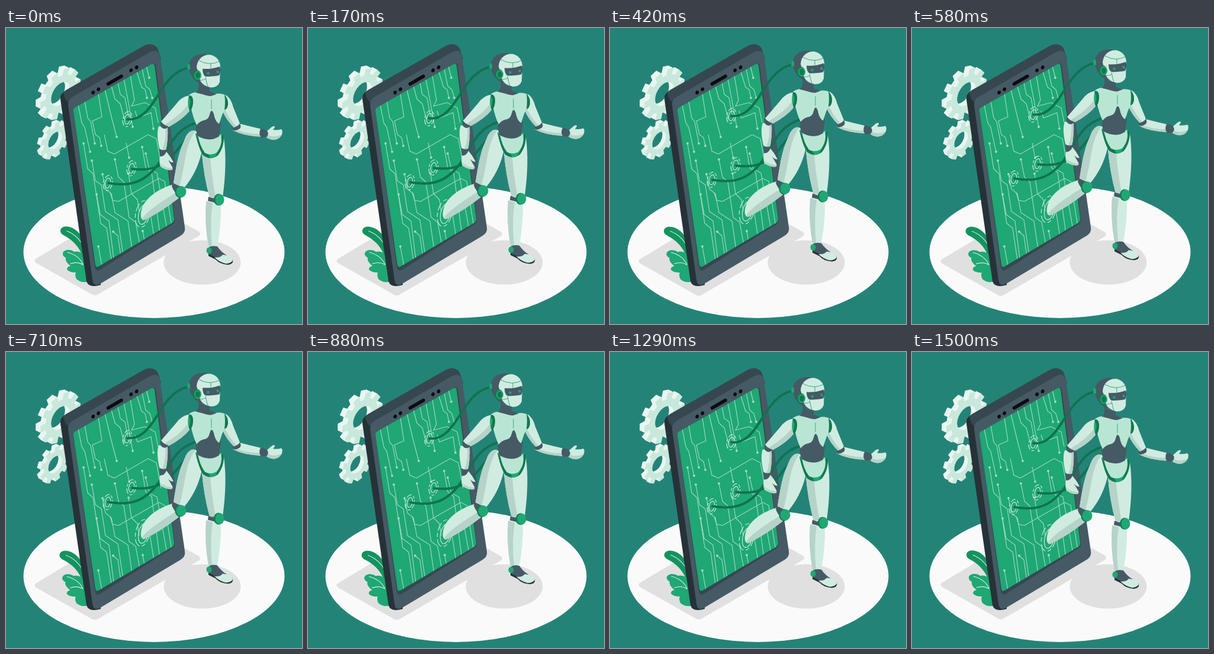
Recreate the animation shown at these times as an HTML page. Size 500x500 px, loop 1540 ms.

```html
<!DOCTYPE html>
<html lang="en">
<head>
<meta charset="utf-8">
<title>Robot leaving a phone</title>
<style>
html, body { margin: 0; height: 100%; overflow: hidden; background: #248377; }
svg { display: block; width: 100vw; height: 100vh; }
.pale { fill: #d0ece1; } .mint { fill: #b9e6d4; } .shade { fill: #b5d3c8; }
.dark { fill: #37474f; } .slate { fill: #455a64; }
.green { fill: #1fa774; } .deep { fill: #12794f; }
.line { fill: none; stroke: #a5dcc4; stroke-width: 1.1; }
.seam { fill: none; stroke: #36a582; stroke-width: 1; }
.cable { fill: none; stroke: #0f7350; stroke-width: 4; stroke-linecap: round; }
.ring { fill: none; stroke: #c3ead9; stroke-width: 1.2; }
.vein { fill: none; stroke: #d5f0e5; stroke-width: 1.1; stroke-linecap: round; }
</style>
</head>
<body>
<svg viewBox="0 0 500 500">
  <defs>
    <clipPath id="screen"><path d="M114 141Q113 136 117 134L246 61Q250 59 251 64L284 321Q285 326 281 329L156 403Q152 405 151 400Z"/></clipPath>
  </defs>
  <ellipse cx="250" cy="378.500" rx="220.500" ry="111.500" fill="#fafafa"/>
  <path id="ground" fill="#e0e0e0" d="M50 390L130 342L303 331L326 344Q330 348 326 351L155 450Q150 453 145 450L51 397Q46 393 50 390Z"/>
  <ellipse cx="331.500" cy="396" rx="65" ry="37.500" fill="#e0e0e0"/>

  <g id="gears"></g>

  <g id="leaves">
    <path fill="#14935f" d="M92 342C93 334 105 333 116 340C128 348 134 362 136 382L128 382C122 368 112 358 99 351Q91 347 92 342Z"/>
    <path class="vein" d="M103 343Q121 350 131 369"/>
    <path class="green" d="M96 380C99 373 110 374 115 378C122 376 129 380 133 384L140 428Q128 432 119 424Q116 418 118 413Q107 413 103 408Q103 403 109 402Q99 394 101 388Q95 385 96 380Z"/>
    <path class="vein" d="M104 379Q123 384 130 399M109 398Q121 394 130 400"/>
  </g>

  <g id="phone">
    <path fill="#263238" d="M92 121Q91 111 99 107L160 120L160 434Q140 440 136 428Z"/>
    <path class="dark" d="M97 109Q98 107 101 105L233 30Q247 23 256 34L262 52L110 130Q98 122 97 109Z"/>
    <path class="slate" d="M105 131Q104 121 113 116L241 42Q257 33 260 47L302 336Q304 346 294 351.500L160 431.500Q148 439 146 425Z"/>
    <path class="dark" d="M114 141Q113 136 117 134L248 60Q252 58 253 64L285 322Q286 328 282 331L158 409Q151 412 150 403Z"/>
    <path stroke="#0b0d0f" stroke-width="5.500" stroke-linecap="round" d="M172.500 94.500L195 81.500M147 109.500L147.400 108.500M156 104L156.400 103M211 72L211.400 71M220.500 67L220.800 66"/>
    <g clip-path="url(#screen)">
      <path class="green" d="M100 40H300V420H100Z"/>
      <g id="circuit"></g>
    </g>
  </g>

  <g id="robot">
    <g id="rings"></g>
    <path class="cable" d="M205 154C234 157 248 126 264 103C277 82 294 68 312 67"/>
    <path class="cable" d="M213 238C250 243 270 230 287 209Q304 187 322 174"/>
    <path class="cable" d="M173 262C212 269 238 260 262 223C284 183 295 168 322 160"/>

    <!-- far arm -->
    <path class="pale" d="M371 113Q380 118 384 134L395 161Q391 168 385 168Q371 154 366 140Q373 128 371 113Z"/>
    <path class="shade" d="M368 133Q375 151 389 166L385 168Q371 154 366 140Z"/>
    <path class="pale" d="M384 169L396 162Q415 167 433 171L431 183Q402 183 384 173Z"/>
    <path class="shade" d="M384 169Q402 179 431 179V184Q402 182 383 173Z"/>
    <path class="slate" d="M382 169Q390 167 395 162Q398 166 395 170Q389 174 384 173Z"/>
    <path class="slate" d="M430 170Q439 171 445 177Q441 186 431 185Q426 179 430 170Z"/>
    <path class="pale" d="M441 174L449 167Q455 164 454 168L451 172Q459 173 465 171Q468 173 466 180Q462 188 453 189Q446 189 440 185Q445 179 441 174Z"/>
    <path class="shade" d="M443 181Q452 186 466 180Q462 188 453 189Q446 189 440 185Z"/>

    <!-- standing leg -->
    <path class="pale" d="M331 212Q346 224 360 212L368 186Q374 228 366 286L344 287Q334 250 331 212Z"/>
    <path class="shade" d="M331 212L345 219Q347 249 354 286L344 287Q334 250 331 212Z"/>
    <path class="pale" d="M338 293Q346 289 363 298Q364 330 357 369H342Q335 330 338 293Z"/>
    <path class="shade" d="M338 293L349 296Q344 327 348 369H342Q335 330 338 293Z"/>
    <path class="slate" d="M342 285Q350 289 358 287L356 296Q346 293 341 292Z"/>
    <ellipse class="deep" cx="359" cy="290" rx="8" ry="10"/>
    <ellipse class="green" cx="361" cy="290" rx="7.500" ry="9.500"/>
    <path fill="#263238" d="M342 379Q352 385 383 391Q385 399 375 400Q361 399 354 391L342 385Z"/>
    <path class="slate" d="M343 370Q349 367 357 369Q364 379 373 384L364 392L343 382Z"/>
    <path class="pale" d="M352 387Q361 389 366 383Q382 384 383 393Q379 398 371 398Q359 395 352 387Z"/>
    <ellipse class="green" cx="343" cy="376" rx="4.500" ry="5.500"/>

    <!-- trailing leg -->
    <path class="pale" d="M283 264C258 271 238 286 231 301C225 316 228 326 234 324Q260 312 291 288Z"/>
    <path class="shade" d="M230 322Q237 309 287 278L292 287Q260 312 234 324Z"/>
    <path class="pale" d="M304 183Q312 168 326 176Q333 192 330 212Q322 245 301 270L283 262Q289 221 296 202Z"/>
    <path class="shade" d="M304 183Q312 170 320 174C302 197 303 234 293 267L283 262Q289 221 296 202Z"/>
    <path class="slate" d="M282 262Q290 268 301 270L293 284Q283 277 280 267Z"/>
    <ellipse class="deep" cx="294" cy="277" rx="8.500" ry="10"/>
    <ellipse class="green" cx="296" cy="276.500" rx="8.500" ry="9.500"/>

    <!-- body -->
    <path class="green" d="M320 178Q326 205 333 215Q346 225 358 215Q370 199 367 179Z"/>
    <path class="deep" d="M320 178Q326 205 333 215Q341 220 345 219L326 188ZM358 215Q370 199 367 179L362 184Q365 200 353 218Z"/>
    <path class="mint" d="M324 180Q345 192 363 180Q367 198 355 211Q345 216 336 211Q327 199 324 180Z"/>
    <path class="slate" d="M325 92Q334 100 344 99V107Q350 112 354 113L340 120L320 109Q327 106 325 92Z"/>
    <path class="slate" d="M321 162L345 137L363 160L360 183Q344 194 323 182Q320 170 321 162Z"/>
    <path class="mint" d="M309 113Q320 106 329 110Q338 115 347 115Q357 108 370 113Q375 130 365 147L360 162Q353 158 351 145Q347 134 344 146Q342 155 334 156Q328 157 322 164Q313 146 309 113Z"/>
    <path class="slate" d="M320 109Q338 102 355 112Q347 116 336 113Z"/>
    <path class="seam" d="M347 121V137"/>
    <path class="deep" d="M307 114Q317 112 316 127Q315 139 308 142Q300 128 307 114ZM369 113Q376 119 375 130Q373 139 369 138Q371 124 369 113Z"/>
    <path class="green" d="M308 117Q315 121 308 139Q302 127 308 117Z"/>

    <!-- near arm -->
    <path class="pale" d="M309 114Q296 116 287 129L262 158Q266 166 275 167Q299 154 310 140Q305 129 309 114Z"/>
    <path class="shade" d="M268 163Q296 146 307 130L310 140Q299 154 275 167Z"/>
    <path class="pale" d="M258 166Q253 179 260 207L270 208Q274 188 273 168Z"/>
    <path class="shade" d="M269 168H273Q274 188 270 208L264 207Q271 188 269 168Z"/>
    <path class="slate" d="M261 157Q266 164 274 166Q272 171 266 170Q259 168 261 157Z"/>
    <path class="slate" d="M259 204Q265 208 271 205L272 215Q266 221 260 217Z"/>
    <path class="pale" d="M260 217Q267 218 271 209Q278 217 283 227Q279 228 274 223L281 235Q283 240 278 240Q269 240 261 234Q258 227 260 217Z"/>
    <path class="shade" d="M260 227Q264 235 281 237Q281 241 275 240Q262 237 260 227Z"/>

    <!-- head -->
    <path class="slate" d="M309 70C306 52 321 42 338 44L345 52L338 97Q315 93 309 70Z"/>
    <path class="green" d="M307 61Q310 60 311 64V70Q308 71 306 69Z"/>
    <path class="pale" d="M322 66C323 51 335 44 346 45.500Q360 49 362 64L361 91Q358 100.500 346 100.500Q333 98 328 89Z"/>
    <path class="seam" d="M326 55Q344 65 361 56M346 60V68M337 83Q339 94 341 99M338 86Q330 89 328 88"/>
    <path class="slate" d="M332 69Q348 70 361 65Q364 72 360 80Q350 82 337 82Q332 79 332 69Z"/>
    <path stroke="#229d88" stroke-width="4.500" stroke-linecap="round" d="M341.500 76.500h.1M357.500 74h.1"/>
    <ellipse class="deep" cx="322.500" cy="79.500" rx="7" ry="8.500"/>
    <ellipse class="green" cx="324" cy="80" rx="6" ry="7.500"/>
    <ellipse class="deep" cx="324" cy="80" rx="4" ry="5.500"/>
  </g>
</svg>
<script>
const LOOP = 1540;
const $ = id => document.getElementById(id);

// Toothed wheel with an open centre, in its own flat plane
function gearPath(radius, teeth) {
  const points = [];
  for (let i = 0; i < teeth; i++) {
    for (const [step, r] of [[-.3, .76], [-.24, 1], [.24, 1], [.3, .76]]) {
      const a = (i + step) / teeth * 2 * Math.PI;
      points.push([Math.cos(a) * radius * r, Math.sin(a) * radius * r].map(n => n.toFixed(1)));
    }
  }
  const h = radius * .46;
  return `M${points.join('L')}ZM${-h} 0a${h} ${h} 0 1 0 ${2 * h} 0a${h} ${h} 0 1 0 ${-2 * h} 0Z`;
}

// The wheel stands in the isometric plane, with its rim built up from layers
function gear(x, y, radius, teeth, depth) {
  const d = gearPath(radius, teeth);
  let layers = '';
  for (let i = depth; i >= 0; i--) {
    const fill = i ? '#e9f6f1' : '#c9e8dc';
    layers += `<path fill="${fill}" fill-rule="evenodd" transform="matrix(.866 -.5 0 1 ${x - i} ${y - i * .5})" d="${d}"/>`;
  }
  return layers;
}
$('gears').innerHTML = gear(92, 111.5, 39.5, 10, 8) + gear(83, 190, 29, 9, 6);

// Each trace ends in a dot; "-" at the start puts it at the first point instead, "=" leaves it out
const traces = [
  '122 130L128 160L133 168L142 209', '133 124L138 152L143 158L150 195', '156 111L162 150L146 157L151 180L158 185L161 199',
  '167 104L178 150L187 184', '=178 98L184 120L193 128L200 154', '=189 92L193 112L201 118L207 150',
  '199 86L206 122L214 167', '=210 80L217 122L212 132L235 126L252 135L257 160', '221 74L229 100L235 104L238 118',
  '230 69L236 98L243 104L247 118', '237 64L242 84', '=166 180L172 208L183 213L240 180L254 187L262 230', '218 140L222 152L245 143L249 170',
  '-131 195L138 238L147 246L160 330L170 338L178 392', '-145 224L151 258L161 265L168 310L189 324L198 384',
  '-153 281L159 315L174 326L182 390', '-163 247L168 272L178 280L184 312L206 326L213 374', '-184 222L190 252L199 260L208 320L219 328L226 366',
  '-207 246L212 280L222 290L225 310', '-208 219L203 194', '-230 201L236 236L246 244L260 348', '-236 212L242 238L255 245L272 340',
  '=176 278L180 291L190 293L258 254L268 259L280 335', '-156 369L162 402', '-181 344L189 351L194 386', '-231 343L235 366', '=240 290L250 352'
];
$('circuit').innerHTML = traces.map(trace => {
  const points = trace.replace(/^[-=]/, '');
  const ends = points.split('L');
  const [x, y] = (trace[0] === '-' ? ends[0] : ends.at(-1)).split(' ');
  const dot = trace[0] === '=' ? '' : `<circle cx="${x}" cy="${y}" r="1.900" fill="#a5dcc4"/>`;
  return `<path class="line" d="M${points}"/>${dot}`;
}).join('');

const ring = (x, y, rx, ry, dash) =>
  `<ellipse class="ring" rx="${rx}" ry="${ry}" stroke-dasharray="${dash}" transform="translate(${x} ${y}) rotate(12)"/>`;
$('rings').innerHTML = [[205, 154], [212, 237], [172, 262]].map(([x, y]) =>
  ring(x, y, 4.5, 8.5, 'none') + ring(x, y, 7.5, 13, '9 3 5 3')).join('')
  + ring(232, 315, 8, 17, 'none') + ring(231, 314, 12, 23, '14 4 7 4');

function draw(now) {
  const lift = (1 - Math.cos((now + 35) / LOOP * 2 * Math.PI)) / 2;
  $('robot').setAttribute('transform', `translate(0 ${-8.6 * lift})`);
  $('leaves').setAttribute('transform', `rotate(${-lift} 132 430)`);
  $('ground').setAttribute('transform', `translate(0 ${lift})`);
  requestAnimationFrame(draw);
}
requestAnimationFrame(draw);
</script>
</body>
</html>
```
